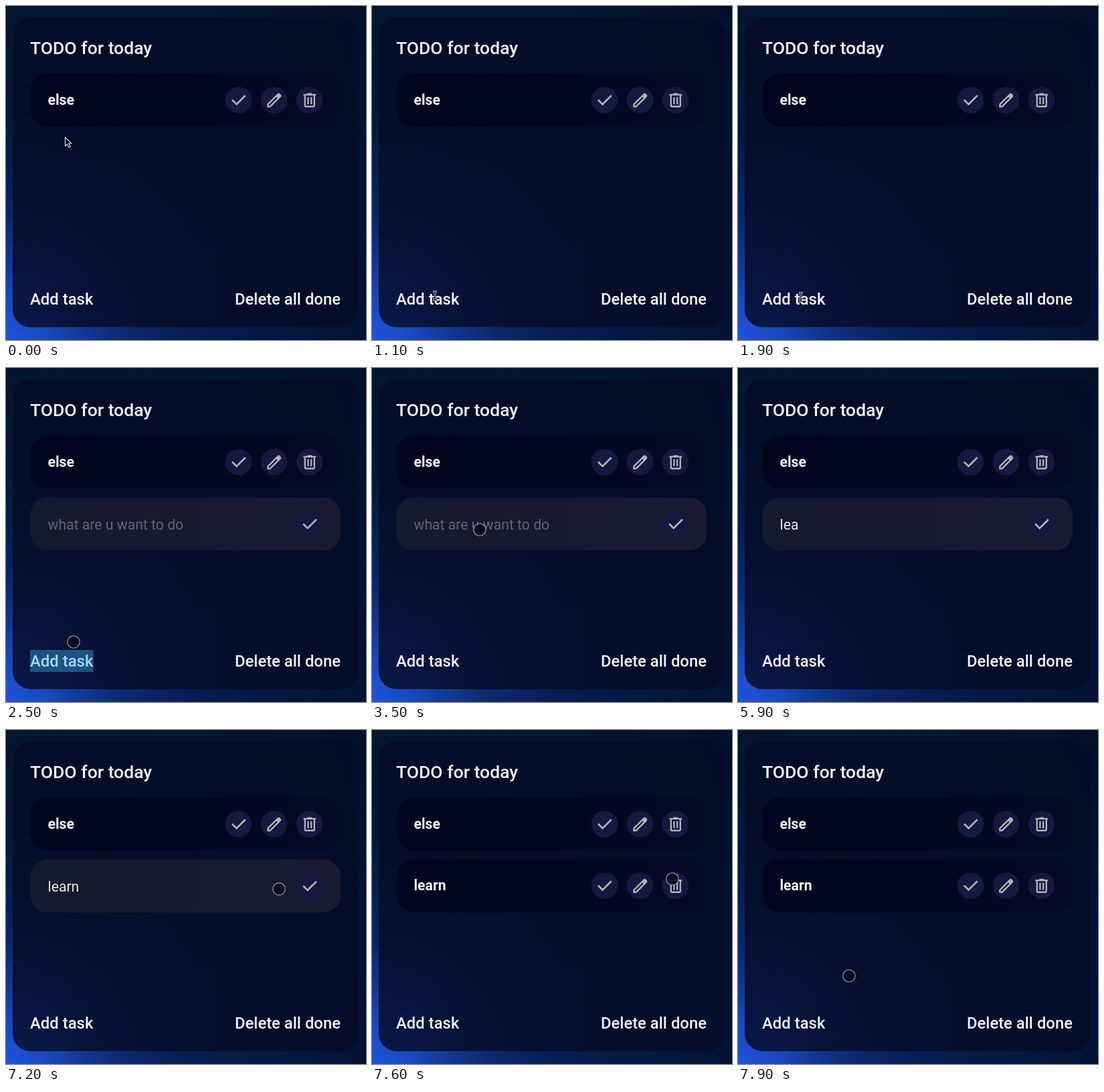
Write an HTML page with a canvas that moves like this. It is 538 px wide and 500 px high and loops after 8 s.

```html
<!DOCTYPE html>
<html lang="en">
<head>
<meta charset="utf-8">
<title>Todo list</title>
<style>
html, body { margin: 0; width: 538px; height: 500px; overflow: hidden; background: #02142f; }
canvas { display: block; }
</style>
</head>
<body>
<canvas id="stage" width="538" height="500"></canvas>
<script>
const W = 538, H = 500, LOOP = 8000, STEP = 100;
const U = 1.325; // page zoom
const ctx = document.getElementById('stage').getContext('2d');
const ROW = { x: 36.5, w: 350 * U, h: 60 * U, r: 20 * U };
const ROW_Y = [101, 193.75];
const ICON = '#b3b3b6';

// Cursor path: time, x, y, shape; null shape hides it
const CURSOR = [
  [0, 88, 196, 'arrow'], [200, 88, 196, 'arrow'], [600, 130, 224, 'arrow'],
  [1000, 173, 232, 'arrow'], [1100, 94, 434, 'beam'], [1500, 95, 439, 'beam'],
  [1900, 94, 436, 'beam'], [2000, 92, 420, 'dot'], [2100, 91, 386, 'dot'],
  [2300, 101, 410, 'dot'], [2500, 101, 410, 'dot'], [2700, 161, 242, 'dot'],
  [4900, 161, 242, null], [6800, 170, 242, 'dot'], [7200, 408, 238, 'dot'],
  [7500, 449, 226, 'dot'], [7600, 449, 223, 'dot'], [7900, 166, 368, 'dot']
];

// Typed value at each moment
const TYPED = [[0, ''], [4900, 'l'], [5000, 'le'], [5300, 'lea'], [6000, 'lear'], [6100, 'learn']];
const CARET = [[3000, 3500], [4000, 4500], [4900, 5900], [6000, 6800], [7300, 7600]];

function lastAt(list, t) {
  let i = 0;
  while (i + 1 < list.length && list[i + 1][0] <= t) i++;
  return i;
}

function radial(x, y, r, stops) {
  const g = ctx.createRadialGradient(x, y, 0, x, y, r);
  stops.forEach(([p, c]) => g.addColorStop(p, c));
  return g;
}

function linear(x0, y0, x1, y1, ...colors) {
  const g = ctx.createLinearGradient(x0, y0, x1, y1);
  colors.forEach((c, i) => g.addColorStop(i / (colors.length - 1), c));
  return g;
}

function box(x, y, w, h, r, fill) {
  ctx.beginPath();
  ctx.roundRect(x, y, w, h, r);
  ctx.fillStyle = fill;
  ctx.fill();
}

function disc(x, y, r, fill) {
  ctx.beginPath();
  ctx.arc(x, y, r, 0, Math.PI * 2);
  ctx.fillStyle = fill;
  ctx.fill();
}

function label(text, x, y, size, weight, color = '#f4f5f8', align = 'left') {
  ctx.font = `${weight} ${size * U}px Roboto, sans-serif`;
  ctx.textAlign = align;
  ctx.fillStyle = color;
  ctx.fillText(text, x, y);
}

const ICONS = {
  check: [1.33, 'M9.55 18 3.85 12.3 5.28 10.88 9.55 15.15 18.73 5.98 20.15 7.4Z'],
  edit: [1.18, 'M5 19H6.4L16.2 9.2 14.8 7.8 5 17.6ZM3 21V16.75L16.2 3.6Q17.6 2.4 19 3.6L20.4 5Q21.6 6.4 20.4 7.8L7.25 21Z'],
  trash: [1.17, 'M7 21Q5 21 5 19V6H4V4H9V3H15V4H20V6H19V19Q19 21 17 21ZM17 6H7V19H17ZM9 17H11V8H9ZM13 17H15V8H13Z']
};
for (const icon of Object.values(ICONS)) icon[1] = new Path2D(icon[1]);

function button(name, x, y) {
  const [scale, path] = ICONS[name];
  disc(x, y, 15 * U, '#15183f');
  ctx.save();
  ctx.translate(x + .3, y + .3);
  ctx.scale(scale, scale);
  ctx.translate(-12, -12);
  ctx.fillStyle = ICON;
  ctx.fill(path, 'evenodd');
  ctx.restore();
}

function drawBackdrop() {
  ctx.fillStyle = linear(0, 0, 0, H, '#02152f', '#031b43', '#041c4c');
  ctx.fillRect(0, 0, W, H);
  ctx.fillStyle = radial(0, H, 340, [
    [0, '#1f55dc'], [.2, 'rgba(28,78,206,.85)'], [.55, 'rgba(17,54,146,.45)'], [1, 'rgba(8,30,90,0)']
  ]);
  ctx.fillRect(0, 0, W, H);
  ctx.fillStyle = linear(300, 0, W, 0, 'rgba(1,12,36,0)', 'rgba(1,12,36,.6)');
  ctx.fillRect(0, 0, W, H);
  box(10, 17, 390 * U, 350 * U, 20 * U, 'rgba(5,11,37,.8)');
}

function drawTask(name, y) {
  const fill = linear(ROW.x, 0, ROW.x + ROW.w, 0, 'rgba(2,3,28,.8)', 'rgba(2,3,28,.7)', 'rgba(4,7,34,.35)');
  box(ROW.x, y, ROW.w, ROW.h, ROW.r, fill);
  label(name, 62.5, y + 47, 16, 700);
  ['check', 'edit', 'trash'].forEach((icon, i) => button(icon, 347.5 + i * 53, y + 39.8));
}

function drawInput(t) {
  const y = ROW_Y[1];
  box(ROW.x, y, ROW.w, ROW.h, ROW.r, linear(ROW.x, 0, ROW.x + ROW.w, 0, '#15192e', '#191a30'));
  const value = TYPED[lastAt(TYPED, t)][1];
  if (value) label(value, 62.5, y + 48, 16, 400, '#e6e7ea');
  else label('what are u want to do', 62.5, y + 48, 16, 400, '#62646b');
  if (CARET.some(([on, off]) => t >= on && t < off)) {
    ctx.fillStyle = '#e6e7ea';
    ctx.fillRect(63 + (value ? ctx.measureText(value).width : 0), 222, 1.5, 25);
  }
  button('check', 453.7, y + 39.8);
}

function drawArrow(x, y) {
  ctx.beginPath();
  [[0, 0], [0, 13], [3, 10.2], [5.3, 15.2], [7.6, 14.2], [5.4, 9.3], [9.3, 9.3]]
    .forEach(([dx, dy]) => ctx.lineTo(x + .5 + dx, y + .5 + dy));
  ctx.closePath();
  ctx.fillStyle = '#05070f';
  ctx.fill();
  ctx.strokeStyle = '#e8e8ee';
  ctx.lineWidth = 1.1;
  ctx.stroke();
}

function drawBeam(x, y) {
  const line = (color, width) => {
    ctx.beginPath();
    ctx.moveTo(x - 3, y - 6.5);
    ctx.quadraticCurveTo(x, y - 6.5, x, y - 4);
    ctx.lineTo(x, y + 4);
    ctx.quadraticCurveTo(x, y + 6.5, x + 3, y + 6.5);
    ctx.moveTo(x + 3, y - 6.5);
    ctx.quadraticCurveTo(x, y - 6.5, x, y - 4);
    ctx.moveTo(x - 3, y + 6.5);
    ctx.quadraticCurveTo(x, y + 6.5, x, y + 4);
    ctx.moveTo(x - 2.5, y + 2.5);
    ctx.lineTo(x + 2.5, y + 2.5);
    ctx.strokeStyle = color;
    ctx.lineWidth = width;
    ctx.stroke();
  };
  line('#dcdde4', 2.8);
  line('#080b18', 1.2);
}

function drawDot(x, y) {
  disc(x, y, 9.2, 'rgba(5,8,26,.88)');
  ctx.strokeStyle = '#8f92a2';
  ctx.lineWidth = 1.3;
  ctx.stroke();
}

function drawCursor(t) {
  const i = lastAt(CURSOR, t);
  const [t0, x0, y0, shape] = CURSOR[i];
  const [t1, x1, y1] = CURSOR[i + 1] || [LOOP, x0, y0];
  if (!shape) return;
  // the pointer rests on the field until typing starts
  const k = (t - t0) / (t1 - t0);
  const draw = { arrow: drawArrow, beam: drawBeam, dot: drawDot }[shape];
  draw(x0 + (x1 - x0) * k, y0 + (y1 - y0) * k);
}

function render(t) {
  drawBackdrop();
  label('TODO for today', 36, 71.5, 20, 500);
  drawTask('else', ROW_Y[0]);
  if (t >= 7600) drawTask('learn', ROW_Y[1] - .5);
  else if (t >= 2500) drawInput(t);

  const selected = t >= 2500 && t < 2700;
  if (selected) {
    ctx.fillStyle = '#1b5484';
    ctx.fillRect(36, 422, 94.5, 33);
  }
  label('Add task', 36, 447, 18, 500, selected ? '#a5d8f4' : undefined);
  label('Delete all done', 500, 447, 18, 500, undefined, 'right');
  drawCursor(t);
}

function frame() {
  const t = performance.now() % LOOP;
  render(Math.floor(t / STEP) * STEP);
  requestAnimationFrame(frame);
}
frame();
</script>
</body>
</html>
```
